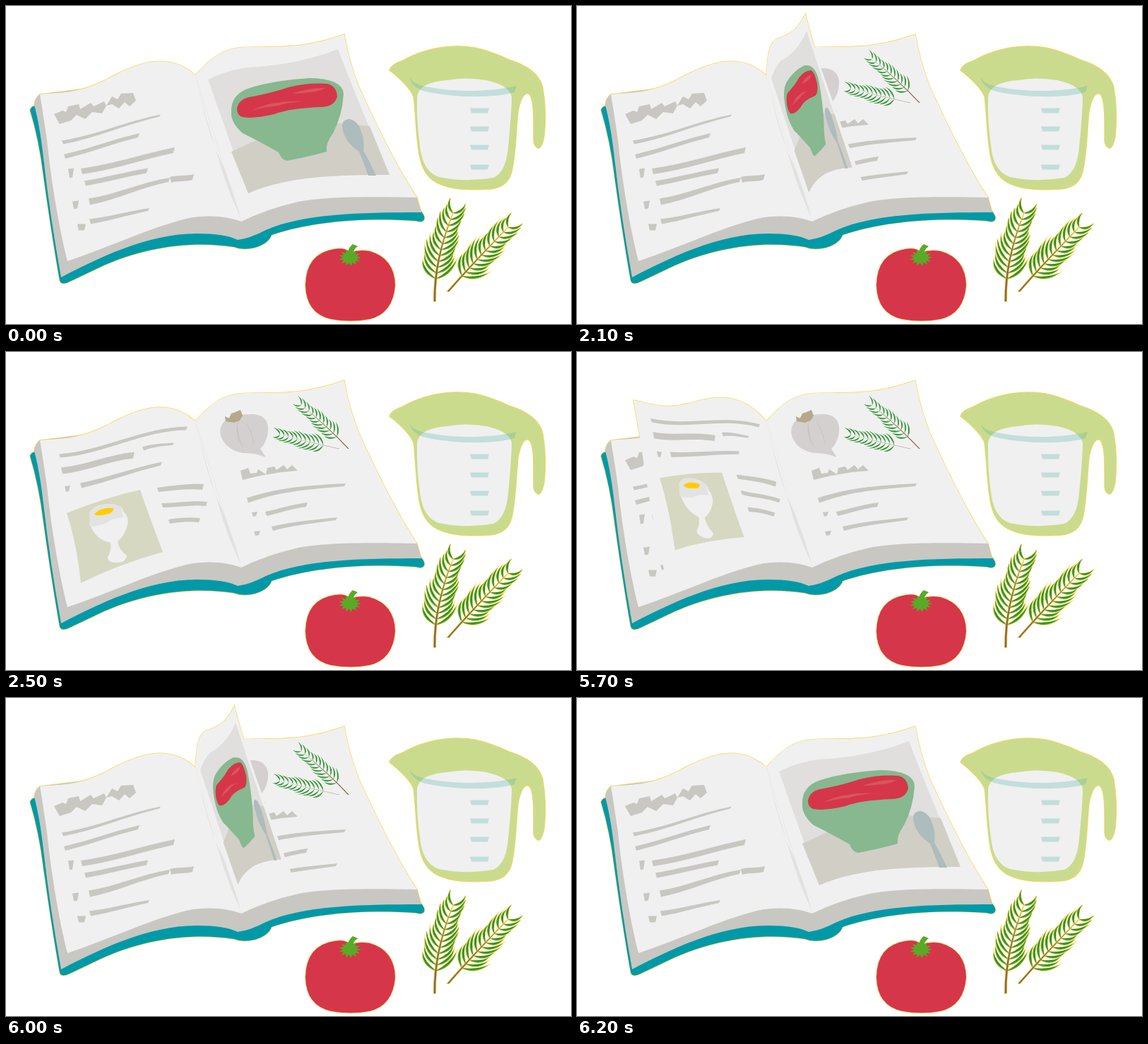
Recreate the animation shown at these times as an HTML page with a canvas. Size 800 by 450 pixels, loop 7200 ms.

```html
<!DOCTYPE html>
<html lang="en">
<head>
<meta charset="utf-8">
<title>Cookbook</title>
<style>
html, body { margin: 0; width: 100%; height: 100%; overflow: hidden; background: #fff; }
canvas { display: block; width: 800px; height: 450px; }
</style>
</head>
<body>
<canvas id="stage" width="800" height="450"></canvas>
<script>
const ctx = document.getElementById('stage').getContext('2d');
const PAPER = '#f0f0f0', GREY = '#c8c7c2', TEAL = '#0099a8', RED = '#d63649';
const GLASS = 'rgba(90,180,170,.3)', FRINGE = '#ffd54f';

// Shapes are [colour, path]; paths hold absolute "x,y" pairs only.
const r = n => n.toFixed(1);
function bar(x, y, X, Y, h = 6, b1 = 0, b2 = -b1, H = h) {
  const mx = k => r(x + (X - x) * k), my = k => y + (Y - y) * k;
  const a = h / 2, z = H / 2, m = (a + z) / 2;
  return `M${x},${y - a} C${mx(.35)},${r(my(.35) + b1 - m)} ${mx(.65)},${r(my(.65) + b2 - m)} ${X},${Y - z} ` +
    `L${X - 2},${Y + z} C${mx(.65)},${r(my(.65) + b2 + m)} ${mx(.35)},${r(my(.35) + b1 + m)} ${x + 2},${y + a}Z`;
}
const text = (...bars) => bars.map(b => [GREY, bar(...b)]);

function sprig(x, y, cx, cy, X, Y, count, len, w) {
  const at = t => {
    const s = 1 - t;
    return [s * s * x + 2 * s * t * cx + t * t * X, s * s * y + 2 * s * t * cy + t * t * Y];
  };
  const stem = `M${x - w * .4},${y} Q${cx - w * .4},${cy} ${X},${Y} Q${cx + w * .4},${cy} ${x + w * .4},${y}Z`;
  const shapes = [['#8a6a45', stem]];
  for (let i = 0; i < count; i++) {
    const t = .27 + .73 * i / (count - 1), [px, py] = at(t), [qx, qy] = at(t + .01);
    const dir = Math.atan2(qy - py, qx - px), l = len * (1.1 - .45 * t);
    for (const side of [-1, 1]) {
      const point = (turn, d) => {
        const a = dir + side * turn;
        return r(px + d * Math.cos(a)) + ',' + r(py + d * Math.sin(a));
      };
      const tip = point(.8 - .25 * t, l * (1 + .12 * Math.sin(i * 5 + side)));
      const leaf = (inner, outer) => `M${r(px)},${r(py)} Q${point(inner, l * .6)} ${tip} Q${point(outer, l * .6)} ${r(px)},${r(py)}Z`;
      const spread = w / l * 1.6;
      shapes.push(['#228b3b', leaf(1.15 - spread, 1.15 + spread)], ['#5fae2a', leaf(1.15 + spread * .3, 1.15 + spread)]);
    }
  }
  return shapes;
}

const leftPage = [PAPER, 'M48,125 C75,122 100,125 140,105 C185,80 230,63 268,98 L333,305 C315,299 290,294 255,301 C200,315 150,340 87,361 C74,310 63,240 58,190 Q53,155 48,125Z'];
const rightPage = [PAPER, 'M268,98 C300,60 320,57 365,58 C410,58 440,54 479,40 Q486,80 500,115 C525,170 555,230 582,271 C520,270 450,269 410,278 Q370,287 333,305Z'];

const book = [
  [TEAL, 'M34,147 Q36,141 44,141 L268,150 588,291 Q594,298 592,302 Q590,307 580,304 C510,299 435,304 376,324 Q372,336 352,342 Q335,346 323,341 C265,332 195,340 130,371 Q105,383 90,390 Q78,396 76,388 C66,330 60,290 53,240 Q47,190 34,147Z'],
  [GREY, 'M48,125 Q41,130 40,140 Q48,170 53,215 Q62,295 78,384 C130,357 200,322 270,322 Q310,322 328,331 Q345,329 368,317 C420,294 500,292 588,292 L582,271 268,98Z']
];
const spine = [['#e2e1df', 'M270,105 Q283,170 300,210 Q315,240 332,299 Q318,270 308,240 Q296,200 284,160 Q275,130 270,105Z']];

const listPage = [
  leftPage,
  [GREY, 'M68,153 L80,148 85,150 88,142 103,139 105,146 120,137 124,142 139,135 142,141 150,128 158,132 163,124 180,123 184,134 175,142 168,136 160,145 150,139 142,141 136,152 122,150 112,160 100,154 92,162 76,167Z'],
  ...text([79, 193, 219, 155, 5, 5, -3, 3], [82, 213, 189, 183, 6, 2], [106, 234, 239, 204, 8, 4, -1],
    [88, 237, 96, 236, 13], [111, 251, 201, 233, 7, 1], [117, 277, 232, 246, 9, 4, -4, 6],
    [232, 246, 266, 242, 8, -2, 2], [94, 282, 103, 281, 11],
    [118, 305, 203, 288, 7, 2, -1, 4], [101, 313, 113, 313, 9])
];
const bowlPage = [
  rightPage,
  ['#e0dfdd', 'M286,104 Q310,92 340,87 C390,85 435,75 470,61 Q500,140 543,239 C470,239 400,240 343,265 Q320,200 286,104Z'],
  ['#d1cec6', 'M319,206 Q380,178 400,168 L470,166 515,170 543,239 C470,239 400,240 343,265Z'],
  ['#adbcbd', 'M476,170 Q476,160 487,160 Q499,163 503,178 Q508,190 506,205 Q515,220 524,240 L513,240 Q505,218 500,206 Q478,192 476,170Z'],
  ['#87b88f', 'M319,150 Q318,125 345,116 Q380,105 430,102 Q478,103 478,125 Q476,155 463,180 Q452,195 454,206 Q430,213 398,219 Q390,218 386,207 Q350,187 335,180 Q318,165 319,150Z'],
  [RED, 'M327,145 Q330,130 350,128 Q380,122 400,115 Q430,108 455,110 Q468,113 469,128 Q465,143 445,143 Q400,145 380,153 Q350,160 335,157 Q327,155 327,145Z'],
  ['#d8575f', 'M348,148 Q368,138 385,137 Q395,134 424,135 Q400,136 385,141 Q365,143 348,148Z M405,124 Q430,115 453,116 Q440,122 430,122 Q415,124 405,124Z']
];
const eggPage = [
  leftPage,
  ...text([75, 147, 257, 108, 5, 9, -13], [78, 168, 182, 146, 9, 4], [193, 137, 238, 130, 5, -3, -1, 3],
    [83, 194, 91, 193, 8], [105, 189, 221, 158, 7, 2, -2, 5],
    [214, 195, 280, 191, 6, -1, -3, 8], [220, 217, 285, 215, 6, 1, -3], [230, 240, 275, 238, 6, -2, -2]),
  ['#d6d8c1', 'M86,228 Q140,206 190,195 Q200,225 222,283 Q160,300 106,327 Q100,270 86,228Z'],
  [PAPER, 'M118,228 Q122,217 145,215 Q165,216 166,225 Q175,235 172,245 Q167,262 158,268 Q160,280 171,288 Q170,298 157,298 Q143,298 144,290 Q150,280 148,270 Q124,265 118,240Z'],
  ['#e3e3e1', 'M118,228 Q125,215 145,215 L163,218 166,234 Q150,235 140,243 Q125,248 118,246Z'],
  ['#fc0', 'M125,229 Q135,219 152,221 Q153,228 140,230 Q128,233 125,229Z']
];
const herbPage = [
  rightPage,
  ['#d4d0d0', 'M318,91 Q300,102 304,118 Q310,138 335,143 Q352,142 368,149 L360,137 Q372,125 371,105 Q368,89 350,88 Q332,88 318,91Z'],
  ['#c4bfbf', 'M329,97 Q322,115 337,137 Q325,115 329,97Z M338,96 Q351,115 351,133 Q349,115 338,96Z'],
  ['#b5a98d', 'M311,98 L310,91 316,94 319,87 325,85 332,82 335,90 331,97 323,100Z'],
  [GREY, 'M332,168 L343,164 346,172 355,171 357,166 368,173 370,164 380,162 383,167 393,160 398,166 405,160 413,168 390,170 360,175 335,181Z'],
  ...text([341, 210, 481, 188, 7, -9, -4, 4], [348, 230, 356, 229, 6], [367, 229, 427, 216, 6, 0, -2],
    [351, 257, 360, 256, 6], [376, 250, 469, 236, 6, -3, -1, 4]),
  ...sprig(472, 137, 430, 128, 388, 117, 11, 20, 2.2),
  ...sprig(485, 137, 455, 105, 418, 75, 11, 20, 2.2)
];
// Reverse of the leaf while it curls over the left page.
const curledPage = [
  [PAPER, 'M268,98 Q256,85 252,68 Q238,28 205,12 Q185,7 159,8 Q192,40 194,80 L215,150 Q232,220 265,290 L333,305Z'],
  ...text([193, 39, 229, 39, 8, 2, 2], [205, 69, 241, 69, 8, 1, 1], [215, 97, 241, 97, 8, 1, 1], [223, 125, 249, 125, 8, 1, 1]),
  ['#d6d8c1', 'M227,147 L244,148 Q265,160 282,170 Q295,225 315,279 L289,263 255,258Z'],
  [PAPER, 'M249,170 Q262,160 272,175 Q284,195 276,212 Q278,235 286,248 Q290,266 277,263 Q248,255 251,235 Q257,220 250,200 Q246,185 249,170Z'],
  ['#e3e3e1', 'M249,180 L270,183 277,199 258,197Z'],
  ['#fc0', 'M252,170 Q262,169 267,181 Q257,184 252,170Z']
];

const spikes = Array.from({ length: 26 }, (_, i) => {
  const a = i * Math.PI / 13, d = i % 2 ? 10 : 16;
  return r(487 + d * Math.cos(a)) + ',' + r(356 + d * .75 * Math.sin(a));
});
const cup = 'M543,91 Q545,83 560,78 C600,55 650,51 685,65 Q700,70 712,76 C735,83 755,95 760,115 Q766,150 762,185 Q758,203 753,201 Q746,198 747,185 C747,160 748,130 740,124 Q730,122 725,150 C722,180 722,210 716,235 Q710,257 685,259 C655,261 630,260 610,250 Q590,240 585,210 C580,180 580,150 577,128 Q570,112 543,91Z';
const tomato = 'M424,395 Q425,350 465,344 Q480,341 488,349 Q500,344 515,347 Q550,357 551,395 Q548,435 515,443 Q488,448 460,443 Q425,435 424,395Z';
const rosemary = [...sprig(607, 418, 606, 360, 633, 293, 12, 36, 3.4), ...sprig(626, 404, 660, 365, 711, 313, 12, 34, 3.4)];
const kitchen = [
  ['#cbdb8e', cup],
  [PAPER, 'M582,130 Q583,108 625,105 Q650,100 680,105 Q712,112 716,128 Q716,150 711,200 Q708,235 690,243 Q650,250 613,242 Q592,235 587,205 Q581,165 582,130Z'],
  [GLASS, 'M572,101 Q575,111 600,115 C640,123 690,121 723,113 L720,122 C690,131 630,130 590,120 Q572,112 572,101Z'],
  ...[148, 174, 200, 228].map(y => [GLASS, bar(657, y, 684, y, 7, 0, 0)]),
  [RED, tomato],
  ['#5aaa28', 'M' + spikes.join(' L') + 'Z M483,352 Q485,341 491,337 L498,340 Q491,345 490,354Z'],
  ...rosemary
];

// Shifts points in proportion to their distance from the spine.
const warp = (top, foot) => path => path.replace(/(-?[\d.]+),(-?[\d.]+)/g, (_, x, y) => {
  const dx = x - 268, dy = y - 98;
  const u = (dx * .953 - dy * .302) / 219, v = (dx * .302 + dy * .953) / 215;
  const move = k => u * (top[k] + (foot[k] - top[k]) * v);
  return r(+x + move(0)) + ',' + r(+y + move(1));
});
const bend = (page, ...shifts) => page.map(([c, p]) => [c, warp(...shifts)(p)]);
const turning = [
  bend(bowlPage, [-67, -29], [-69, -11]),
  bend(bowlPage, [-156, -30], [-153, -11]),
  bend(curledPage, [-230, 0], [-230, 0]),
  curledPage,
  bend(eggPage, [-32, 55], [-32, 43])
];
const poses = Array.from({ length: 7 }, (_, k) => {
  const leaf = turning[k - 1] || [];
  const left = k < 6 ? listPage : eggPage, right = k > 0 ? herbPage : bowlPage;
  const fill = [...book, ...left, ...right, ...leaf, ...spine, ...kitchen];
  const edges = [book[0], book[1], leftPage, rightPage, ...leaf.slice(0, 1), [0, cup], [0, tomato], ...rosemary];
  return {
    fill: fill.map(([c, p]) => [c, new Path2D(p)]),
    edges: edges.map(([, p]) => new Path2D(p))
  };
});

function poseAt(t) {
  if (t < 2000) return 0;
  if (t < 5700) return Math.min(6, 1 + Math.floor((t - 2000) / 100));
  return Math.max(0, 5 - Math.floor((t - 5700) / 100));
}

function draw() {
  const { fill, edges } = poses[poseAt(performance.now() % 7200)];
  ctx.clearRect(0, 0, 800, 450);
  for (const [colour, path] of fill) {
    ctx.fillStyle = colour;
    ctx.fill(path);
  }
  // The yellow fringe only shows outside the shapes.
  ctx.globalCompositeOperation = 'destination-over';
  ctx.strokeStyle = FRINGE;
  ctx.lineWidth = 1.4;
  edges.forEach(path => ctx.stroke(path));
  ctx.globalCompositeOperation = 'source-over';
  requestAnimationFrame(draw);
}
draw();
</script>
</body>
</html>
```
